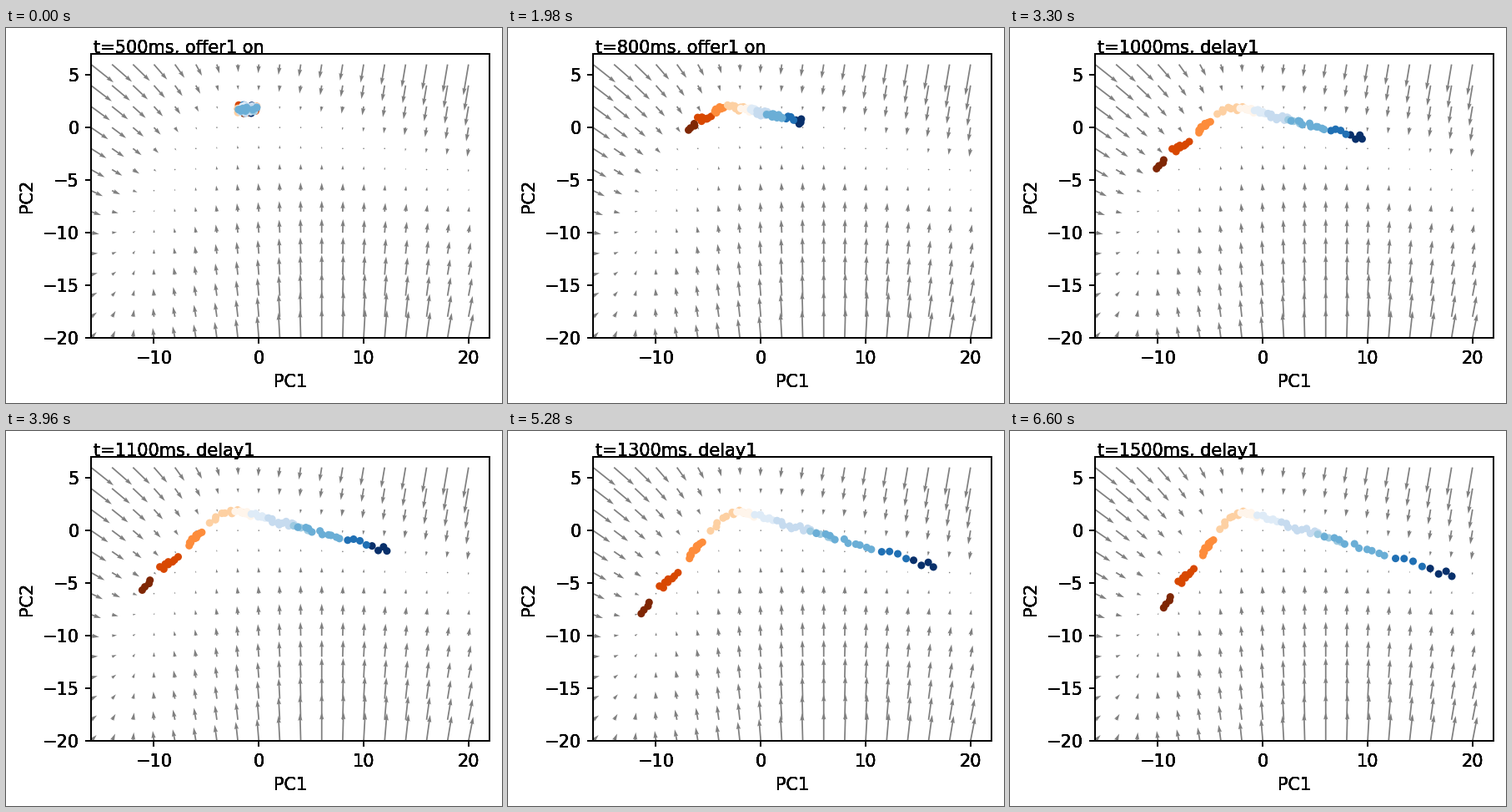
Animation, 595 px wide and 449 px high, one loop 7920 ms. Source, as a matplotlib script:

```python
import matplotlib.pyplot as plt
import numpy as np
from matplotlib.animation import FuncAnimation

W, H, DPI = 595, 449, 150
LEFT, RIGHT, TOP, BOTTOM = 102, 580, 31, 371
LAST, FRAMES, STEP_MS = 20, 24, 330
START_X = -1.1

rng = np.random.default_rng(4)
fig = plt.figure(figsize=(W / DPI, H / DPI), dpi=DPI, facecolor="white")
rect = [LEFT / W, 1 - BOTTOM / H, (RIGHT - LEFT) / W, (BOTTOM - TOP) / H]


def add_panel(name):
    panel = fig.add_axes(rect, label=name, facecolor="none")
    panel.set(xlim=(-16, 22), ylim=(-20, 7), xlabel="PC1", ylabel="PC2",
              xticks=range(-10, 21, 10), yticks=range(-20, 6, 5))
    return panel


# Stacked copies of panel and title give the heavy lettering.
ax, *_ = [add_panel(f"panel{i}") for i in range(6)]
titles = [fig.text(105.4 / W, 1 - 30 / H, "", fontsize=10) for _ in range(6)]


def bend(x, peak_x, peak_y, left, right, blur):
    """Two straight slopes joined by a rounded corner."""
    u = x - peak_x
    return (peak_y + (left + right) / 2 * u
            - (left - right) / 2 * np.hypot(u, blur))


def flow(x, y):
    """Arrow lengths in pixels: a pull towards the resting curve."""
    gap = y - bend(x, -2.6, 2.1, 1.0, -0.308, 1)
    above = gap > 0
    pull = np.where(above, 2.2 + 0.06 * x, 1.35 + 0.55 * np.tanh((x - 1) / 5))
    lean = np.where(above, -0.35 + 0.52 * np.tanh((x + 4.5) / 4),
                    np.clip(0.014 * (x - 6), -0.25, 0.2))
    drift = 1.2 * np.maximum(-9 - x, 0)
    v = -pull * gap
    return lean * v + drift, v


gx, gy = np.meshgrid(np.arange(-16, 21, 2), np.arange(-20, 7, 2))
ax.quiver(gx, gy, *flow(gx, gy), color="gray", scale_units="dots", scale=1)

# colour map, level, range of shares of the full spread, number of dots
GROUPS = [("Oranges", 1, -1, -0.94, 4), ("Oranges", 0.75, -0.82, -0.68, 8),
          ("Oranges", 0.5, -0.56, -0.44, 11), ("Oranges", 0.25, -0.36, -0.05, 9),
          ("Oranges", 0, -0.1, 0.03, 7), ("Blues", 1, 0.89, 1, 4),
          ("Blues", 0.75, 0.72, 0.85, 4), ("Blues", 0.125, 0.03, 0.13, 7),
          ("Blues", 0.25, 0.15, 0.33, 10), ("Blues", 0.375, 0.33, 0.45, 5),
          ("Blues", 0.5, 0.37, 0.67, 10)]
share = np.concatenate([np.linspace(a, b, n) for *_, a, b, n in GROUPS])
colors = [plt.get_cmap(name)(float(level))
          for name, level, *_, n in GROUPS for _ in range(n)]
jitter = np.clip(rng.normal(size=(2, len(share))), -1.8, 1.8)


def positions(step):
    reach_left = 10.4 * np.sin(np.pi * step / 29) ** 1.2
    reach_right = 19.2 * np.sin(np.pi * step / 40) ** 1.7
    x = START_X + share * np.where(share < 0, reach_left, reach_right)
    y = bend(x, -3.8 + 0.06 * step, 2.3 - 0.01 * step,
             0.35 + 0.05 * step, -0.2 - 0.0055 * step, 0.7)
    early = np.exp(-step / 3)
    x = x + jitter[0] * (0.1 + 0.4 * early)
    y = y + jitter[1] * (0.14 + 0.08 * early)
    return np.column_stack([x, y])


dots = ax.scatter(*positions(0).T, s=19, c=colors, linewidths=0, zorder=3)


def update(frame):
    step = min(frame, LAST)
    ms = 500 + 50 * step
    dots.set_offsets(positions(step))
    for title in titles:
        title.set_text(f"t={ms}ms, {'offer1 on' if ms < 1000 else 'delay1'}")
    return [dots, *titles]


anim = FuncAnimation(fig, update, frames=FRAMES, interval=STEP_MS,
                     repeat=True, repeat_delay=0)
plt.show()
```
